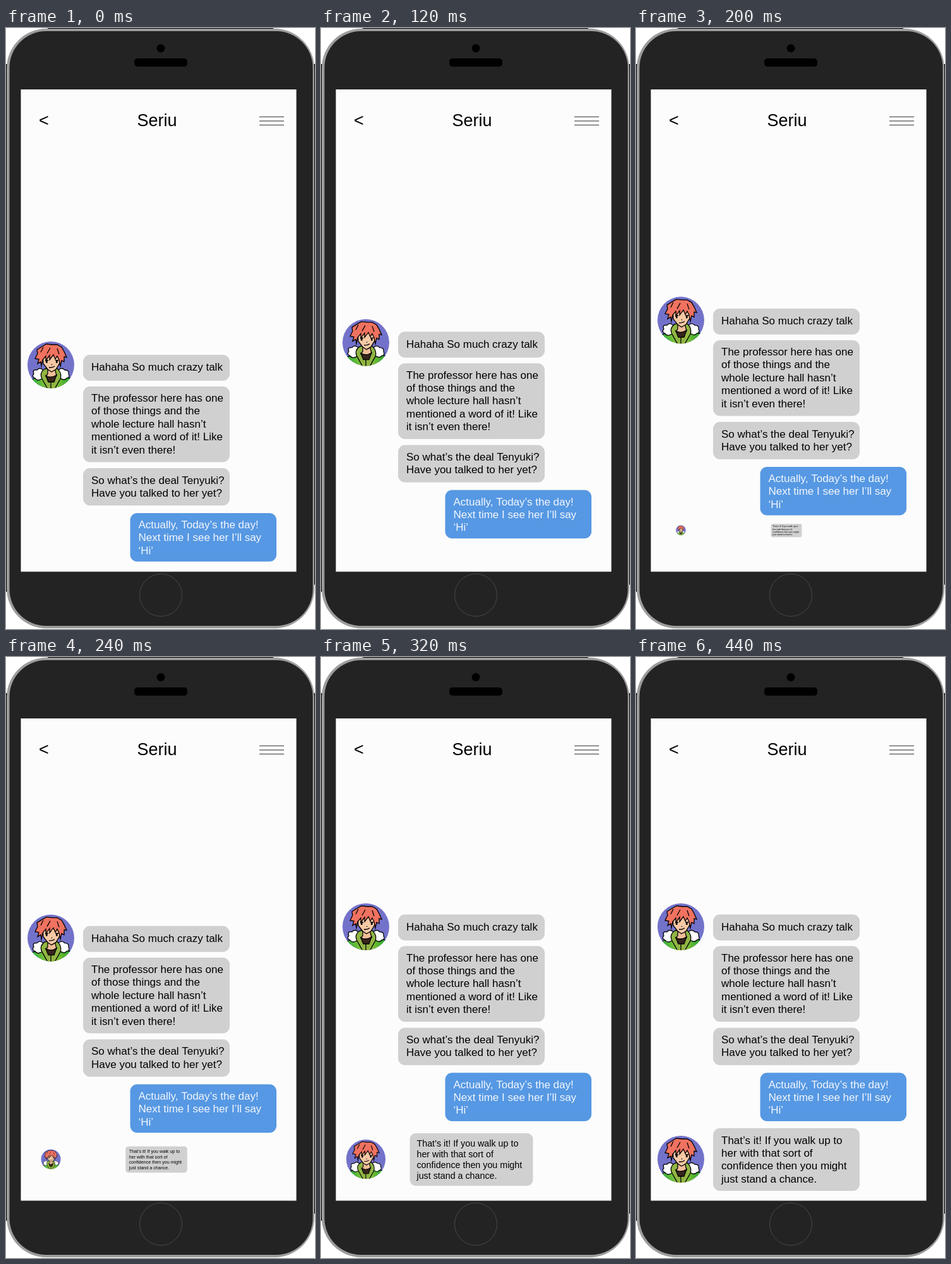
An HTML page with a canvas for the animation above (640 ms loop, 489 px wide and 949 px high).

```html
<!DOCTYPE html>
<html lang="en">
<head>
<meta charset="utf-8">
<title>Chat</title>
<style>
  html, body { margin: 0; width: 489px; height: 949px; overflow: hidden; background: #fff; }
  canvas { display: block; }
</style>
</head>
<body>
<canvas id="stage" width="489" height="949"></canvas>
<script>
const ctx = document.getElementById('stage').getContext('2d');
const LOOP = 640, START = 80, STEP = 40, LAST_STEP = 10;
const SCROLL_STEPS = 6, POP_START = 3, POP_PEAK = 8;
const FONT = '"Liberation Sans", Arial, sans-serif';
const GRAY = '#d0d0d0', BLUE = '#5698e3';

const history = [
  { x: 122, y: 516, w: 232, h: 41, base: 541, lines: ['Hahaha So much crazy talk'] },
  { x: 122, y: 566, w: 232, h: 119.5, base: 590, lines: [
    'The professor here has one', 'of those things and the', 'whole lecture hall hasn’t',
    'mentioned a word of it! Like', 'it isn’t even there!'] },
  { x: 122, y: 695, w: 232, h: 59, base: 719.5, lines: [
    'So what’s the deal Tenyuki?', 'Have you talked to her yet?'] },
  { x: 196.5, y: 766, w: 231.5, h: 76.5, base: 790, fill: BLUE, ink: '#f4f7fc', lines: [
    'Actually, Today’s the day!', 'Next time I see her I’ll say', '‘Hi’'] }
];
const reply = { x: 122, y: 744, w: 232, h: 99, base: 768.5, lines: [
  'That’s it! If you walk up to', 'her with that sort of',
  'confidence then you might', 'just stand a chance.'] };

function roundBox(x, y, w, h, r, fill) {
  ctx.beginPath();
  ctx.roundRect(x, y, w, h, r);
  ctx.fillStyle = fill;
  ctx.fill();
}

function circle(x, y, r) {
  ctx.beginPath();
  ctx.arc(x, y, r, 0, Math.PI * 2);
}

function label(text, x, y, size, color = '#000', align = 'left') {
  ctx.font = `${size}px ${FONT}`;
  ctx.textAlign = align;
  ctx.fillStyle = color;
  ctx.fillText(text, x, y);
}

function bubble({ x, y, w, h, base, lines, fill = GRAY, ink = '#000' }) {
  roundBox(x, y, w, h, 11, fill);
  lines.forEach((line, i) => label(line, x + 13, base + i * 20.45, 17, ink));
}

// Draws at a given centre and scale.
function at(x, y, scale, draw) {
  ctx.save();
  ctx.translate(x, y);
  ctx.scale(scale, scale);
  draw();
  ctx.restore();
}

const portrait = {
  jacket: new Path2D('M-34 24Q0 12 34 22L26 40H-26Z'),
  collar: new Path2D('M-9 6Q-19 12-14 22L-5 38H6L15 22Q18 12 9 5Z'),
  shirt: new Path2D('M-8 17Q0 22 9 16L5 27H-4Z'),
  neck: new Path2D('M-5 5V14L-8 18Q1 24 9 17L6 5Z'),
  furLeft: new Path2D('M-12 8Q-18 3-22 8Q-30 7-27 14Q-31 19-25 21Q-21 27-13 21Z'),
  furRight: new Path2D('M12 8Q17 3 22 8Q29 8 28 14Q31 20 25 21Q21 26 14 20Z'),
  face: new Path2D('M-13-18L-12-2L-5 7L1 11L8 7L14-3L15-18Z'),
  hair: new Path2D('M-15 2L-16-5L-21-2L-19-9L-25-10L-21-18L-22-24L-14-29L-7-33L2-32L10-32' +
    'L17-28L21-21L25-12L21-13L21-5L17-7L15 2L13-8L10-14L7-9L4-16L-2-8L-2-15L-8-7L-8-14L-13-8Z')
};

function portraitArt() {
  ctx.save();
  circle(0, 0, 37);
  ctx.clip();
  ctx.fillStyle = '#7372ca';
  ctx.fillRect(-38, -38, 76, 76);
  ctx.strokeStyle = '#000';
  ctx.lineWidth = 1.3;
  const paint = (name, fill) => {
    ctx.fillStyle = fill;
    ctx.fill(portrait[name]);
    ctx.stroke(portrait[name]);
  };
  const green = ctx.createLinearGradient(-25, 38, 30, 20);
  green.addColorStop(0, '#2eae3d');
  green.addColorStop(0.45, '#a5cc35');
  green.addColorStop(1, '#25a52f');
  paint('jacket', green);
  paint('furLeft', '#fff');
  paint('furRight', '#fff');
  paint('collar', '#91b543');
  paint('neck', '#f0bd98');
  paint('shirt', '#37251c');
  paint('face', '#f6c8a4');
  paint('hair', '#f07260');
  ctx.fillStyle = '#000';
  for (const x of [-9, 7]) {
    ctx.fillRect(x, -8, 5, 1.5);
    ctx.fillRect(x + 1, -7, 2.6, 4);
  }
  ctx.stroke(new Path2D('M-3 4Q2 5 6 2M1-1L2 0M0 27V37M-12-28L-16-20M-1-27L-6-18M10-26L13-17'));
  ctx.restore();
}

function phone() {
  ctx.fillStyle = '#fff';
  ctx.fillRect(0, 0, 489, 949);
  ctx.fillStyle = '#000';
  ctx.fillRect(66, 0, 357, 2);
  ctx.fillRect(0, 57, 2, 833);
  ctx.fillRect(487, 57, 2, 822);
  roundBox(1, 1, 487, 947, 63, '#9c9c9c');
  roundBox(5.5, 5, 480, 939, 58, '#232323');
  circle(245, 32, 6.5);
  ctx.fillStyle = '#000';
  ctx.fill();
  roundBox(203, 48, 84, 13, 5, '#000');
  circle(245, 895.5, 33.5);
  ctx.strokeStyle = '#484848';
  ctx.lineWidth = 1;
  ctx.stroke();
  ctx.fillStyle = '#fcfcfc';
  ctx.fillRect(23.5, 97, 436, 761.5);
  label('<', 52, 154.5, 27);
  label('Seriu', 239, 154.5, 27, '#000', 'center');
  ctx.fillStyle = '#777';
  for (const y of [139.5, 146, 152.5]) ctx.fillRect(401, y, 39, 1.6);
}

function popScale(step) {
  if (step <= POP_START) return 0;
  if (step <= POP_PEAK) return 1.05 * (step - POP_START) / (POP_PEAK - POP_START);
  return 1.05 - 0.05 * (step - POP_PEAK) / (LAST_STEP - POP_PEAK);
}

function render(time) {
  const step = Math.max(0, Math.min(LAST_STEP, Math.floor((time - START) / STEP) + 1));
  const scroll = Math.min(step / SCROLL_STEPS, 1);
  phone();
  at(71, 532 - 106 * scroll, 1, portraitArt);
  at(0, -109.5 * scroll, 1, () => history.forEach(bubble));

  const scale = popScale(step);
  if (scale > 0) {
    at(71, 793, scale, portraitArt);
    const cx = reply.x + reply.w / 2, cy = reply.y + reply.h / 2;
    at(cx, cy, scale, () => {
      ctx.translate(-cx, -cy);
      bubble(reply);
    });
  }
}

function tick() {
  render(performance.now() % LOOP);
  requestAnimationFrame(tick);
}
tick();
</script>
</body>
</html>
```
